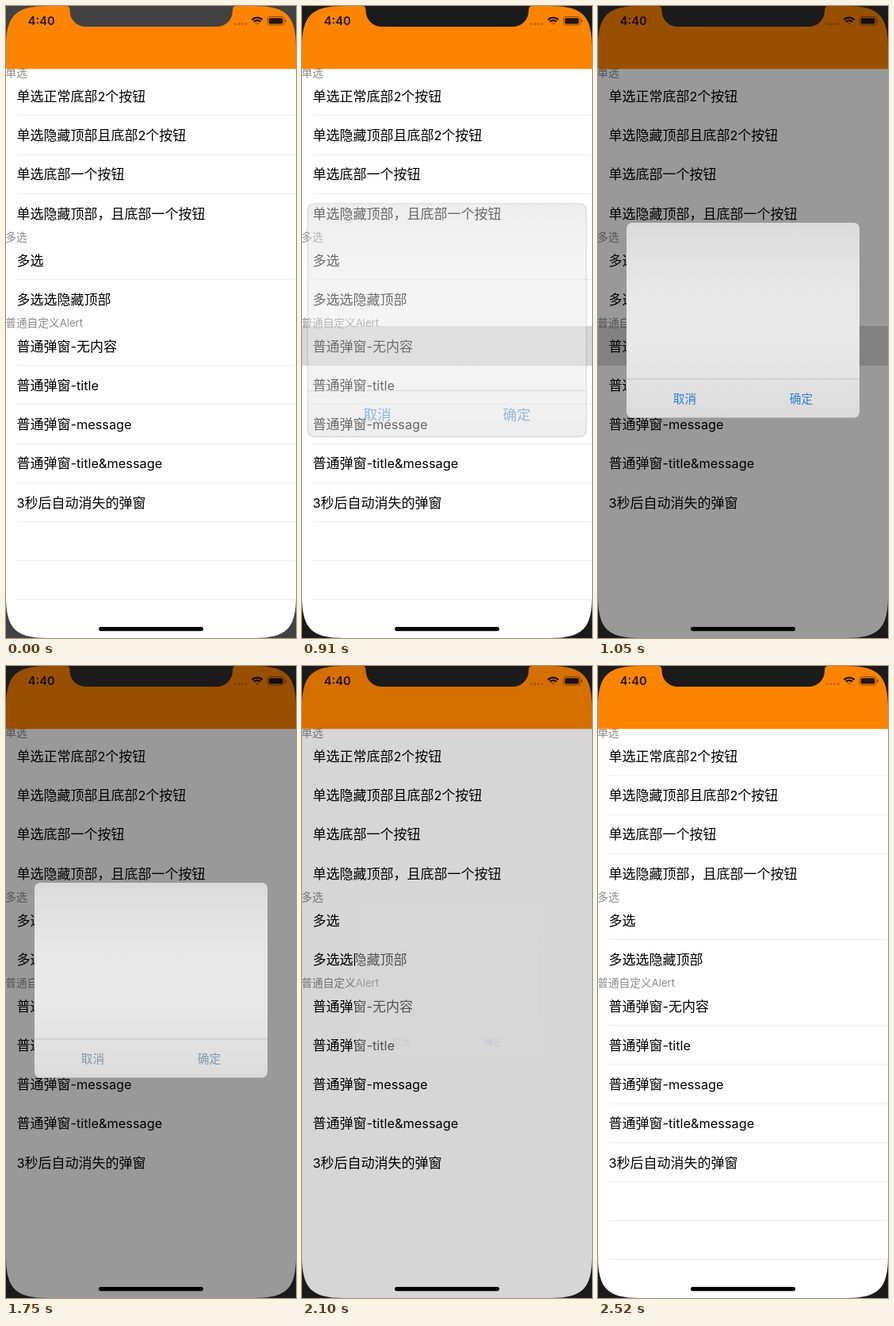
Write an HTML page with a canvas that moves like this. It is 366x796 px and loops after 2.59 s.

```html
<!DOCTYPE html>
<html lang="zh-CN">
<head>
<meta charset="utf-8">
<title>Alert list</title>
<style>
html, body { margin: 0; width: 100%; height: 100%; overflow: hidden; background: #1c1c1c; }
canvas { display: block; width: 366px; height: 796px; }
</style>
</head>
<body>
<canvas id="stage"></canvas>
<script>
const W = 366, H = 796, LOOP = 2590, STEP = 70;
const BAR = 79.3, ROW = 49.2, SECTION = 9.8, INDENT = 14;
const PRESS = 770, ENTER = 840, POP = 910, SHOWN = 1050, RELEASE = 1120, TINT = 1680, LEAVE = 1890, GONE = 2170;

const canvas = document.getElementById('stage');
const ctx = canvas.getContext('2d');
const dpr = window.devicePixelRatio || 1;
canvas.width = W * dpr;
canvas.height = H * dpr;

const LATIN = 'Inter, Roboto, sans-serif';
const CJK = '"Noto Sans CJK SC", "Noto Sans CJK", sans-serif';
const INK = '#26131c', FAINT_INK = 'rgba(40,20,20,.5)';
const PRESSED_ROW = '普通弹窗-无内容';

const sections = [
  { title: '单选', rows: ['单选正常底部2个按钮', '单选隐藏顶部且底部2个按钮', '单选底部一个按钮', '单选隐藏顶部，且底部一个按钮'] },
  { title: '多选', rows: ['多选', '多选选隐藏顶部'] },
  { title: '普通自定义Alert', rows: [PRESSED_ROW, '普通弹窗-title', '普通弹窗-message', '普通弹窗-title&message', '3秒后自动消失的弹窗'] }
];

const progress = (t, from, to) => Math.min(1, Math.max(0, (t - from) / (to - from)));
const easeOut = (p, power) => 1 - (1 - p) ** power;

function rect(x, y, w, h, color) {
  ctx.fillStyle = color;
  ctx.fillRect(x, y, w, h);
}

function pill(x, y, w, h, r, color) {
  ctx.beginPath();
  ctx.roundRect(x, y, w, h, r);
  ctx.fillStyle = color;
  ctx.fill();
}

// Chinese and Latin runs each use their own font
function mixedText(str, x, midY, size, color) {
  ctx.fillStyle = color;
  ctx.textAlign = 'left';
  for (const run of str.match(/[\x20-\x7e]+|[^\x20-\x7e]+/g)) {
    const latin = run.charCodeAt(0) < 127;
    ctx.font = latin ? `${size * 0.96}px ${LATIN}` : `${size}px ${CJK}`;
    ctx.fillText(run, x, midY + size * 0.38);
    x += ctx.measureText(run).width;
  }
}

function separator(y, alpha) {
  rect(INDENT, Math.round(y - 1), W - INDENT, 1, `rgba(200,200,204,${0.32 * alpha})`);
}

function drawList(highlight, lineAlpha) {
  rect(0, 0, W, H, '#fff');
  let y = BAR;
  for (const { title, rows } of sections) {
    const last = rows.length - 1;
    const titleY = y + SECTION / 2;
    y += SECTION;
    rows.forEach((label, i) => {
      if (label === PRESSED_ROW) rect(0, Math.round(y - 1), W, 50, `rgba(215,215,215,${highlight})`);
      mixedText(label, 13.4, y + ROW / 2 - 0.2, 17, '#000');
      y += ROW;
      if (i < last) separator(y, lineAlpha);
    });
    mixedText(title, -0.8, titleY, 13.7, '#8a8a8a');
  }
  for (; y < H; y += ROW) separator(y, lineAlpha);
}

function drawStatus() {
  ctx.fillStyle = INK;
  ctx.textAlign = 'left';
  ctx.font = `600 14.6px ${LATIN}`;
  ctx.fillText('4:40', 27.8, 24.2);

  for (let i = 0; i < 4; i++) pill(288 + i * 4.6, 21.3, 2.8, 2.8, 1.4, 'rgba(60,30,0,.32)');

  // Wi-Fi fan
  ctx.strokeStyle = INK;
  ctx.lineWidth = 2.2;
  const fan = (y, r) => {
    ctx.beginPath();
    ctx.arc(317, y, r, -Math.PI * 0.75, -Math.PI * 0.25);
  };
  fan(24, 9.4);
  ctx.stroke();
  fan(24, 5.8);
  ctx.stroke();
  fan(24.2, 3.6);
  ctx.lineTo(317, 24.2);
  ctx.fill();

  // Battery
  ctx.beginPath();
  ctx.roundRect(330, 13.5, 21, 10.6, 3);
  ctx.strokeStyle = FAINT_INK;
  ctx.lineWidth = 1;
  ctx.stroke();
  pill(331.7, 15.2, 17.6, 7.2, 1.6, INK);
  pill(352.3, 17, 1.4, 3.8, 0.7, FAINT_INK);
}

function drawAlert({ scale, alpha, flat, edge, tint }) {
  const w = 294, h = 245.5, left = -w / 2, top = -h / 2, divider = top + h * 0.8;
  ctx.save();
  ctx.translate(W / 2, 395.7);
  ctx.scale(scale, scale);

  // Frosted panel, brightest in the middle
  const frost = ctx.createLinearGradient(0, top, 0, -top);
  for (let i = 0; i <= 8; i++) {
    const v = Math.round(218 + 15 * Math.sin(Math.PI * i / 8));
    frost.addColorStop(i / 8, `rgb(${v},${v},${v})`);
  }
  ctx.globalAlpha = alpha * (1 - flat);
  pill(left, top, w, h, 7, frost);
  rect(left, divider, w, 1, '#c4c4c4');
  ctx.globalAlpha = alpha * flat;
  pill(left, top, w, h, 7, '#d7d7d7');

  ctx.globalAlpha = alpha * edge;
  ctx.strokeStyle = 'rgba(0,0,0,.25)';
  ctx.lineWidth = 1;
  ctx.beginPath();
  ctx.roundRect(left, top, w, h, 7);
  ctx.stroke();

  ctx.globalAlpha = alpha * (1 - flat * 0.6);
  ctx.fillStyle = tint;
  ctx.font = `500 14.7px ${CJK}`;
  ctx.textAlign = 'center';
  ctx.fillText('取消', -w / 4, 104.7);
  ctx.fillText('确定', w / 4, 104.7);
  ctx.restore();
}

function drawBezel(color) {
  ctx.fillStyle = color;
  // Continuous-curvature screen corners
  for (const x of [0, W]) for (const y of [0, H]) {
    const sx = x ? -1 : 1, sy = y ? -1 : 1, reach = 52, pull = 12.3;
    ctx.beginPath();
    ctx.moveTo(x, y);
    ctx.lineTo(x + sx * reach, y);
    ctx.bezierCurveTo(x + sx * pull, y, x, y + sy * pull, x, y + sy * reach);
    ctx.fill();
  }

  // Notch with flared top corners
  ctx.beginPath();
  ctx.moveTo(76, 0);
  ctx.quadraticCurveTo(80.5, 0, 80.5, 5);
  ctx.arcTo(80.5, 26, 102, 26, 20);
  ctx.arcTo(286, 26, 286, 5, 20);
  ctx.lineTo(286, 5);
  ctx.quadraticCurveTo(286, 0, 290.5, 0);
  ctx.fill();
}

function draw(t) {
  const pop = progress(t, POP, SHOWN);
  const leave = progress(t, LEAVE, GONE);
  const stay = 1 - leave ** 1.8;
  const dim = easeOut(pop, 1.6) * stay;
  const alpha = easeOut(progress(t, ENTER, SHOWN), 1.6) * stay;
  const highlight = t < PRESS ? 0 : 1 - progress(t, RELEASE, 1400);

  ctx.setTransform(dpr, 0, 0, dpr, 0, 0);
  ctx.globalAlpha = 1;
  drawList(highlight, (1 - dim) ** 3);
  rect(0, 0, W, BAR, '#fc8400');
  drawStatus();
  rect(0, 0, W, H, `rgba(0,0,0,${0.4 * dim})`);
  drawAlert({
    scale: 1 + 0.197 * (1 - pop) ** 2 - 0.36 * (1 - stay),
    alpha,
    flat: Math.sqrt(leave),
    edge: 1 - pop,
    tint: t < TINT ? '#2a80d2' : '#8297ac'
  });
  pill(117, 782, 132, 5.2, 2.6, '#000');
  drawBezel(t < PRESS ? '#424242' : '#1b1b1b');
}

const start = performance.now();
function tick() {
  const t = (performance.now() - start) % LOOP;
  draw(Math.floor(t / STEP) * STEP);
  requestAnimationFrame(tick);
}
tick();
</script>
</body>
</html>
```
